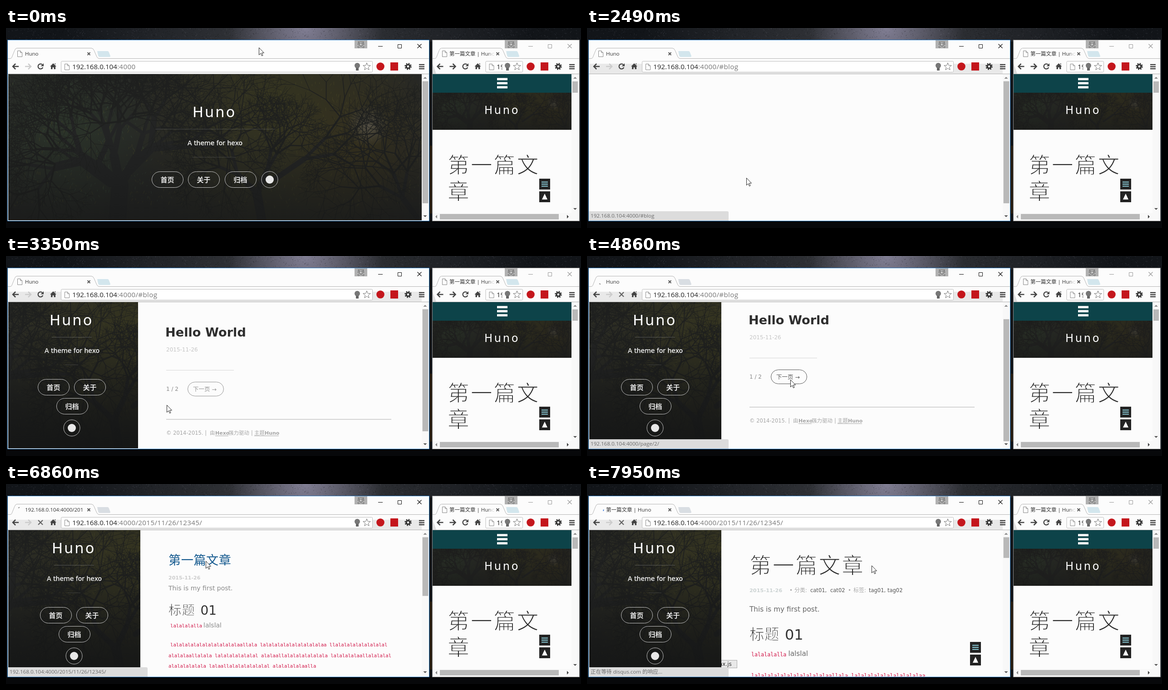
An HTML page that plays this animation: 1267 px wide and 442 px high, repeating every 8000 ms.

```html
<!DOCTYPE html>
<html lang="zh-CN">
<head>
<meta charset="utf-8">
<title>Huno</title>
<style>
html, body { margin: 0; width: 100%; height: 100%; overflow: hidden; background: #0c0e11; }
svg { display: block; }
#stage { position: absolute; left: 0; top: 0; }
text { white-space: pre; font-family: "DejaVu Sans", "Noto Sans CJK SC", "Noto Sans CJK", sans-serif; }
.ui { font-family: "Open Sans", "Noto Sans CJK SC", "Noto Sans CJK", sans-serif; }
.code { font-family: "DejaVu Sans Mono", monospace; fill: #d01245; }
.b { font-weight: 700; }
/* a paper-coloured outline makes the strokes finer */
.thin { font-weight: 300; stroke: #fcfcfc; stroke-width: .034em; }
</style>
</head>
<body>
<svg id="stage" width="1267" height="442"></svg>
<script>
const rect = (x, y, w, h, fill, more = '') =>
  `<rect x="${x}" y="${y}" width="${w}" height="${h}" fill="${fill}" ${more}/>`;
const text = (x, y, size, str, fill = '#333', more = '') =>
  `<text x="${x}" y="${y}" font-size="${size}" fill="${fill}" ${more}>${str}</text>`;
const path = (d, more) => `<path d="${d}" ${more}/>`;
const group = (id, body) => `<g id="${id}">${body}</g>`;
const circle = (x, y, r, more) => `<circle cx="${x}" cy="${y}" r="${r}" ${more}/>`;
const ui = 'class="ui"', bold = 'class="b"', thin = 'class="thin"';

let seed = 11;
const rnd = () => (seed = seed * 16807 % 2147483647) / 2147483647;

// Desktop and woodland picture
function specks(n, w, h, size) {
  let d = '';
  for (let i = 0; i < n; i++) {
    d += `M${(rnd() * w).toFixed(1)} ${(rnd() * h).toFixed(1)}l${(size * (rnd() - .5)).toFixed(1)} ${(size * (rnd() + .1)).toFixed(1)}`;
  }
  return d;
}
const widths = [38, 20, 12, 7, 4, 2.6, 1.8, 1.2, .9, .7];
const wood = widths.map(() => '');
function branch(x, y, angle, len, level) {
  if (level >= widths.length) return;
  const x2 = x + Math.cos(angle) * len, y2 = y + Math.sin(angle) * len;
  wood[level] += `M${x.toFixed(1)} ${y.toFixed(1)}L${x2.toFixed(1)} ${y2.toFixed(1)}`;
  const n = rnd() < .3 ? 3 : 2;
  for (let i = 0; i < n; i++) {
    branch(x2, y2, angle + (i - (n - 1) / 2) * .85 + (rnd() - .5) * .9, len * (.72 + rnd() * .2), level + 1);
  }
}
branch(240, 330, -1.5, 85, 0);
branch(225, 240, -2.5, 75, 1);
branch(250, 230, -.8, 90, 1);
branch(560, 330, -1.75, 70, 1);
branch(590, 230, -.6, 75, 2);
branch(910, 330, -2.2, 70, 2);

const glow = (id, color, x, y, r, a) =>
  `<radialGradient id="${id}" gradientUnits="userSpaceOnUse" cx="${x}" cy="${y}" r="${r}">
  <stop stop-color="${color}" stop-opacity="${a}"/><stop offset="1" stop-color="${color}" stop-opacity="0"/></radialGradient>`;
const fade = (id, c, down) => `<linearGradient id="${id}" x2="${1 - down}" y2="${down}">
  <stop stop-color="${c}" stop-opacity="0"/><stop offset="1" stop-color="${c}"/></linearGradient>`;

const defs = `<defs>
${glow('sky', '#88859c', 660, 0, 170, .9)}${glow('haze', '#4a4b50', 640, 0, 520, .7)}
${glow('olive', '#3f3d1c', 590, 70, 330, .6)}${glow('green', '#2e3b2c', 130, 130, 210, .6)}
${glow('sun', '#5a564d', 793, 113, 48, .8)}${glow('dry', '#3a321a', 780, 160, 200, .6)}
${fade('dusk', '#141515', 1)}${fade('white', '#fcfcfc', 0)}
<g id="tree">${rect(0, 0, 911, 323, '#262725')}
${['olive', 'green', 'dry', 'sun'].map(c => rect(0, 0, 911, 323, `url(#${c})`)).join('')}
${path(specks(1100, 911, 290, 7), 'stroke="#4e4c26" stroke-opacity=".5"')}
${path(specks(350, 330, 280, 6), 'stroke="#3d5540" stroke-opacity=".5"')}
${wood.map((d, i) => path(d, `stroke="${i < 4 ? '#232424' : '#1f201f'}" stroke-width="${widths[i]}" stroke-linecap="round"`)).join('')}
${rect(0, 130, 911, 193, 'url(#dusk)', 'opacity=".6"')}</g>
</defs>`;
const photo = (x, y, w, h, move) => `<svg x="${x}" y="${y}" width="${w}" height="${h}"><use href="#tree" transform="${move}"/></svg>`;

const desktop = rect(0, 0, 1267, 442, '#121519') + rect(0, 0, 1267, 30, 'url(#haze)') + rect(0, 0, 1267, 30, 'url(#sky)') +
  path(specks(900, 1267, 27, 2), 'stroke="#000" stroke-opacity=".3"') +
  path(specks(700, 1267, 27, 1.6), 'stroke="#aab" stroke-opacity=".22"') +
  rect(0, 426, 1267, 16, '#07080a') + rect(934, 260, 5, 150, '#2a2014');

// Browser parts
const sheet = (x, y) => path(`M${x} ${y}h6l4 4v9h-10zM${x + 6} ${y}v4h4`, 'fill="#fff" stroke="#888"');
const cross = (x, y, r, c, w) => path(`M${x - r} ${y - r}l${2 * r} ${2 * r}m0 ${-2 * r}l${-2 * r} ${2 * r}`, `stroke="${c}" stroke-width="${w}"`);
const arrow = (x, dir, c) => path(`M${x - 7 * dir} 85h${13 * dir}m${-6 * dir} -6l${6 * dir} 6l${-6 * dir} 6`, `fill="none" stroke="${c}" stroke-width="2.5"`);
const reload = x => path(`M${x + 4} 81a5.5 5.5 0 1 0 1.2 6`, 'fill="none" stroke="#444" stroke-width="2.3"') +
  path(`M${x + 7} 78v6.5h-6.5z`, 'fill="#444"');
const home = x => path(`M${x} 78l7 7h-2v6h-3.5v-4h-3v4h-3.500v-6h-2zM${x + 3} 78h2v4z`, 'fill="#444"');
const star = x => {
  let d = '';
  for (let i = 0; i < 10; i++) {
    const r = i % 2 ? 3.6 : 8.6, a = i * Math.PI / 5;
    d += (i ? 'L' : 'M') + (x + r * Math.sin(a)).toFixed(1) + ' ' + (85.5 - r * Math.cos(a)).toFixed(1);
  }
  return path(d + 'z', 'fill="#fff" stroke="#777"');
};
const gear = x => circle(x, 85, 6.3, 'fill="none" stroke="#333" stroke-width="3" stroke-dasharray="2.47"') +
  circle(x, 85, 4, 'fill="none" stroke="#333" stroke-width="3.2"');
const tri = (x, y, dx, dy, c) => path(dy ? `M${x - 4} ${y + 2 * dy}h8l-4 ${-4 * dy}z` : `M${x + 2 * dx} ${y - 4}v8l${-4 * dx} -4z`, `fill="${c}"`);

// l, m and r shift the left side, the tab end and the right side
function chrome(l, m, r, left, right, edge, ink) {
  return rect(left + .5, 26.5, right - left - 1, 400, '#fcfcfc', `stroke="${edge}"`) +
    path(`M${left + 1} 67.5h${l + 8 - left}q3 0 4 -3l6 -15q2 -5 5 -5H${m + 188}q4 0 6 5l6 14q2 4 5 4H${right - 1}`, 'fill="none" stroke="#b4b4b4"') +
    path(`M${m + 201} 51h23q2 0 3 3l3 8q0 2 -3 2h-20q-3 0 -4 -3z`, `fill="#d3e6ed" ${l ? '' : 'id="plus"'}`) +
    cross(m + 182.5, 57, 3, '#555', 1.8) +
    rect(r + 768, 27, 28, 18, '#b1b1b1') +
    text(r + 775.5, 41, 13, '天', '#fff', 'class="ui" stroke="#555" stroke-width="2" paint-order="stroke"') +
    path(`M${r + 820} 40.5h10M${r + 863.5} 36.5h8v8h-8z`, `fill="none" stroke="${ink}"`) + cross(r + 911, 40, 4.5, ink, 1.2) +
    (l ? path('M940 79l8 22h-8z', 'fill="#dedede"') : group('shade', rect(5, 79, 911, 22, '#e9e9e9'))) +
    rect(left + 1, 101, right - left - 2, 1, '#b0b0b0') +
    arrow(l + 21, -1, '#444') + arrow(l + 49, 1, l ? '#444' : '#ccc') + home(l + 104) +
    rect(l + 121.5, 73.5, r + 686 - l, 24, '#fff', 'rx="2" stroke="#bcbcbc"') + sheet(l + 129.5, 79.5) +
    circle(r + 774, 83, 6, 'fill="#777"') + rect(r + 771, 88, 6, 6, '#666') + star(r + 795) +
    circle(r + 825, 85, 8.8, 'fill="#c4161c"') + rect(r + 847, 76, 17, 18, '#c4161c') + gear(r + 886) +
    path(`M${r + 910} 81h12m-12 4.5h12m-12 4.5h12`, 'stroke="#444" stroke-width="2.5"');
}

const tools = (x, y) => rect(x, y, 24, 24, '#232323') + rect(x, y + 28, 24, 24, '#232323') +
  path(`M${x + 5} ${y + 7.5}h14m-14 4.5h14m-14 4.5h14`, 'stroke="#8fd3e0" stroke-width="2"') +
  path(`M${x + 12} ${y + 33}l6 13h-12z`, 'fill="#fff"');

const pill = (x, y, str, id = '') => `<g ${id}>` + rect(x + .5, y + .5, 69, 35, 'none', 'rx="18" stroke="#c4c4c4"') +
  text(x + 19.5, y + 23.5, 15, str, '#e4e4e4', bold) + '</g>';
const badge = (x, y) => circle(x, y, 18, 'fill="none" stroke="#c4c4c4"') + circle(x, y, 9, 'fill="#e8e8e8"');
const brand = (x, y, size, gap) => text(x, y, size, 'Huno', '#fff', `letter-spacing="${gap}"`);
const motto = (x, y) => text(x, y, 14, 'A theme for hexo', '#fff', 'stroke="#fff" stroke-width=".25"');
const rule = (x, y, w, c, more) => rect(x, y, w, 1, c, more);

const cover = photo(5, 102, 911, 323, '') + brand(411, 197, 32, 3) + rule(329, 223, 264, '#fff', 'opacity=".16"') +
  motto(400, 259) + rule(410, 285, 96, '#fff', 'opacity=".14"') +
  pill(321, 317, '首页', 'id="homeBtn"') + pill(401, 317, '关于') + pill(482, 317, '归档') + badge(581, 335);

const side = photo(5, 102, 291, 323, 'translate(-310 0)') + rect(5, 160, 291, 265, 'url(#dusk)', 'opacity=".8"') +
  brand(101, 153, 32, 3) + rule(106, 179, 88, '#fff', 'opacity=".24"') + motto(90, 214) +
  rule(136, 240, 28, '#fff', 'opacity=".14"') +
  pill(75, 272, '首页') + pill(155, 272, '关于') + pill(116, 314, '归档') + badge(150, 380);

const list = text(356, 178, 27.2, 'Hello World', '#2e2e2e', bold) + text(358, 211, 12, '2015-11-26', '#c6c6c6') +
  rule(358, 252, 149, '#d6d6d6') + text(358, 298, 12, '1 / 2', '#888') +
  group('next', rect(405.5, 278.5, 79, 31, 'none', 'rx="16" stroke="currentColor"') +
    text(417, 299, 12.5, '下一页 →', 'currentColor')) +
  rect(358, 360, 496, 2, '#d4d4d4') +
  [[358, '© 2014-2015. |'], [454, '由'], [466, 'Hexo', 1], [495, '强力驱动'], [545, '|'], [552, '主题'], [575, 'Huno', 1]]
    .map(([x, s, b]) => text(x, 395, b ? 11 : 11.5, s, '#a6a6a6', b ? bold : '')).join('') +
  rule(466, 397, 29, '#a6a6a6') + rule(552, 397, 54, '#a6a6a6');

const la = n => 'la'.repeat(n);
const first = la(12) + 'allala ' + la(11) + 'a';
const code = (x, y, size, str) => text(x, y, size, str, '#d01245', 'class="code"');
const page2 = group('postLink', text(358, 178, 27.2, '第一篇文章', 'currentColor', 'font-weight="500" letter-spacing=".5"')) +
  text(358, 211, 11, '2015-11-26', '#cdcdcd', bold) + text(358, 235, 14, 'This is my first post.', '#8a8a8a') +
  text(358, 289, 28.5, '标题', '#333', 'class="thin" letter-spacing="1"') + text(428.5, 289, 28, '01') +
  code(362, 317, 10.6, la(4) + 'lla') + text(435, 317, 14, 'lalslal', '#8a8a8a') +
  code(362, 359, 10.6, first + ' l' + la(9) + 'l') +
  code(358, 383, 10.6, `alalalaal${la(3)} ${la(7)}l alalaal${la(8)} ${la(5)}al${la(4)}l`) +
  code(358, 406, 10.6, `a${la(6)} lalaal${la(7)}l a${la(4)}laalla`);

const post = text(358, 197, 48, '第一篇文章', '#2a2a2a', 'class="thin" letter-spacing="2.8"') +
  text(358, 239, 11.3, '2015-11-26', '#ccd3d3', bold) +
  [[446, '•'], [457, '分类:'], [575, '•'], [587, '标签:']].map(([x, s]) => text(x, 239, 12, s, '#aaa')).join('') +
  [[492, 'cat01,'], [536, 'cat02'], [621, 'tag01,'], [662, 'tag02']].map(([x, s]) => text(x, 239, 11.5, s, '#555')).join('') +
  text(358, 282, 15.3, 'This is my first post.', '#666') +
  text(358, 344, 32.5, '标题', '#333', 'class="thin" letter-spacing=".5"') + text(436, 344, 32, '01') +
  code(362, 381, 11.7, la(4) + 'lla') + text(443.5, 380, 15.2, 'lalslal', '#666') +
  code(362, 428, 11.8, first) + tools(844, 349) +
  rect(250.5, 389.5, 80, 17, '#e9e9e9', 'stroke="#aaa"') + text(291, 402, 12, 'ax.js', '#333');

const mainWin = chrome(0, 0, 0, 3, 933, '#2f7fc6', '#111') +
  group('favicon', sheet(25.5, 50.5)) + group('spin', path('M0 -5.5A5.5 5.5 0 0 1 3 -4.6', 'fill="none" stroke="currentColor" stroke-width="1.8"')) +
  text(42, 61, 11.5, '', '#333', 'class="ui" id="tab"') +
  group('reload', reload(76)) + group('stop', cross(76, 85, 5, '#666', 2.4)) +
  text(146, 91, 15.2, '192.168.0.104', '#222', ui) + text(245, 91, 15.2, '', '#777', 'class="ui" id="url" letter-spacing=".33"') +
  `<svg x="5" y="102" width="911" height="323" viewBox="5 102 911 323">` +
  group('cover', cover) + group('slide', group('list', list) + group('page2', page2) + group('post', post) + group('side', side)) + '</svg>' +
  rect(916, 102, 16, 323, '#f8f8f8') + rect(918, 118, 12, 269, '#b9b9b9', 'id="thumb" stroke="#aaa" stroke-width=".5"') +
  tri(923.5, 110, 0, 1, '#888') + tri(923.5, 416, 0, -1, '#555') +
  group('status', path('M4 426V405H309q3 0 3 3V426z', 'fill="#dcdcdc"') + text(8, 419, 11.6, '', '#6a6a6a', 'class="ui" id="note"'));

const rightWin = chrome(935.5, 901, 331, 939, 1264, '#8e8e8e', '#999') +
  sheet(961.5, 50.5) + text(977, 61, 11.5, '第一篇文章 | Hunc', '#333', ui) + rect(1062, 48, 12, 17, 'url(#white)') + reload(1012) +
  `<svg x="1081" y="74" width="13" height="22">${text(0, 17, 15.2, '192', '#222', ui)}</svg>` +
  rect(940, 102, 306, 41, '#0d4349') + path('M1082 113h23m-23 9h23m-23 9h23', 'stroke="#fff" stroke-width="5"') +
  photo(940, 143, 306, 82, 'translate(0 -14) scale(.336)') + rect(940, 143, 306, 82, '#1b1b19', 'opacity=".3"') + brand(1054, 190, 24, 3.8) +
  text(973, 320, 48, '第一篇文', '#2a2a2a', 'class="thin" letter-spacing="2.8"') + text(973, 378, 48, '章', '#2a2a2a', thin) + tools(1175, 333) +
  rect(1246, 102, 17, 307, '#f8f8f8') + rect(1248, 118, 12, 25, '#b9b9b9') + tri(1254, 110, 0, 1, '#888') + tri(1254, 400, 0, -1, '#555') +
  rect(940, 409, 323, 17, '#f8f8f8') + rect(956, 411, 262, 12, '#b9b9b9') + tri(948, 417, 1, 0, '#888') + tri(1238, 417, -1, 0, '#444');

const pointer = group('mouse',
  group('arrow', path('M.5 .5V16.5L4.2 13 6.7 18.5 9 17.5 6.6 12H11.5Z', 'fill="#fff" stroke="#222"')) +
  group('hand', path('M-1.5 1q1.5 -2 3 0v7q1.5 -1.5 3 .5q1.5 -1.5 3 .5q2 -1 2.5 1.5v7l-2 4v3h-7v-3l-6 -8q0 -2.5 2 -1.5l1.5 2z', 'fill="#fff" stroke="#222"')));

document.getElementById('stage').innerHTML = defs + desktop + mainWin + rightWin + pointer;

// Timeline
const LOOP = 8000;
const steps = [0];
for (const [a, b, n] of [[500, 1470, 8], [1780, 1780, 1], [2490, 2490, 1], [2790, 3780, 8],
  [3900, 4860, 8], [5010, 6010, 8], [6160, 7130, 8], [7250, 7950, 6]]) {
  for (let i = 0; i < n; i++) steps.push(Math.floor((a + (b - a) * i / Math.max(1, n - 1)) / 10) * 10);
}
const track = [[0, 557, 43], [360, 557, 43], [1470, 351, 331], [2490, 351, 331], [2900, 354, 329], [4040, 354, 329],
  [4590, 448, 273], [5010, 448, 273], [5400, 449, 271], [6020, 449, 271], [6570, 440, 170], [7380, 440, 170], [7950, 627, 180], [LOOP, 627, 180]];
function mouseAt(t) {
  const i = track.findIndex(k => k[0] > t);
  const [t0, x0, y0] = track[i - 1], [t1, x1, y1] = track[i];
  const p = (t - t0) / (t1 - t0), e = p * p * (3 - 2 * p);
  return [Math.round(x0 + (x1 - x0) * e), Math.round(y0 + (y1 - y0) * e)];
}
const pick = (t, table) => table.findLast(row => row[0] <= t)[1];
const HOST = '192.168.0.104:4000', POST = '/2015/11/26/12345/';
const tabs = [[0, 'Huno'], [5010, HOST + '/pag'], [5430, 'page 2 | Huno'], [6850, HOST + '/201'], [7390, '第一篇文章 | Huno']];
const urls = [[0, ':4000'], [2490, ':4000/#blog'], [5010, ':4000/page/2/'], [6850, ':4000' + POST]];
const notes = [[0, ''], [1330, HOST + '/#blog'], [2790, ''], [4580, HOST + '/page/2/'], [5010, '正在等待 192.168.0.104 的响应...'],
  [5860, ''], [6430, HOST + POST], [7250, '正在等待 192.168.0.104 的响应...'], [7530, '正在等待 disqus.com 的响应...']];
const pages = [[0, 'cover'], [2490, 'list'], [5430, 'page2'], [7390, 'post']];
const thumbs = { cover: 269, list: 269, page2: 129, post: 45 };

const $ = id => document.getElementById(id);
const show = (id, on) => $(id).style.display = on ? '' : 'none';
const move = (id, x, y, more = '') => $(id).setAttribute('transform', `translate(${x} ${y})${more}`);

function draw(t) {
  const page = pick(t, pages), note = pick(t, notes);
  for (const id in thumbs) show(id, id === page);
  show('side', page !== 'cover');
  const left = 1 - Math.min(1, Math.max(0, (t - 2490) / 1000));
  move('slide', -Math.round(912 * left ** 2.65), 0);

  const scroll = page === 'list' ? Math.min(1, Math.max(0, (t - 3760) / 280)) : 0;
  move('list', 0, -Math.round(27 * scroll));
  $('thumb').setAttribute('y', 118 + Math.round(22 * scroll));
  $('thumb').setAttribute('height', thumbs[page]);

  $('tab').textContent = pick(t, tabs);
  $('url').textContent = pick(t, urls);
  $('note').textContent = note;
  show('status', note);
  show('shade', t >= 2490);
  $('plus').setAttribute('fill', t >= 4860 ? '#d9dee3' : '#d3e6ed');

  const busy = t >= 4860 && t < 5430 || t >= 6850;
  show('spin', busy);
  show('stop', busy);
  show('favicon', !busy);
  show('reload', !busy);
  const blue = t >= 7390;
  $('spin').style.color = blue ? '#3b78d8' : '#888';
  move('spin', 31, 57, ` rotate(${blue ? 85 + (t - 7950) * .4 : -45 - (t - 6850) * .3})`);

  const [shape, label] = $('homeBtn').children;
  shape.setAttribute('stroke', t >= 1330 ? '#fff' : '#c4c4c4');
  label.setAttribute('fill', t >= 1780 ? '#fff' : '#e4e4e4');
  $('next').style.color = t >= 4580 ? '#555' : '#939393';
  $('postLink').style.color = t >= 6430 ? '#155a8f' : '#2e2e2e';

  const hand = t >= 5430 && t < 6160;
  show('hand', hand);
  show('arrow', !hand);
  move('mouse', ...mouseAt(t));
}

const start = performance.now();
let last = -1;
function tick() {
  const t = (performance.now() - start) % LOOP;
  const step = steps.findLast(s => s <= t);
  if (step !== last) draw(last = step);
  requestAnimationFrame(tick);
}
tick();
</script>
</body>
</html>
```
